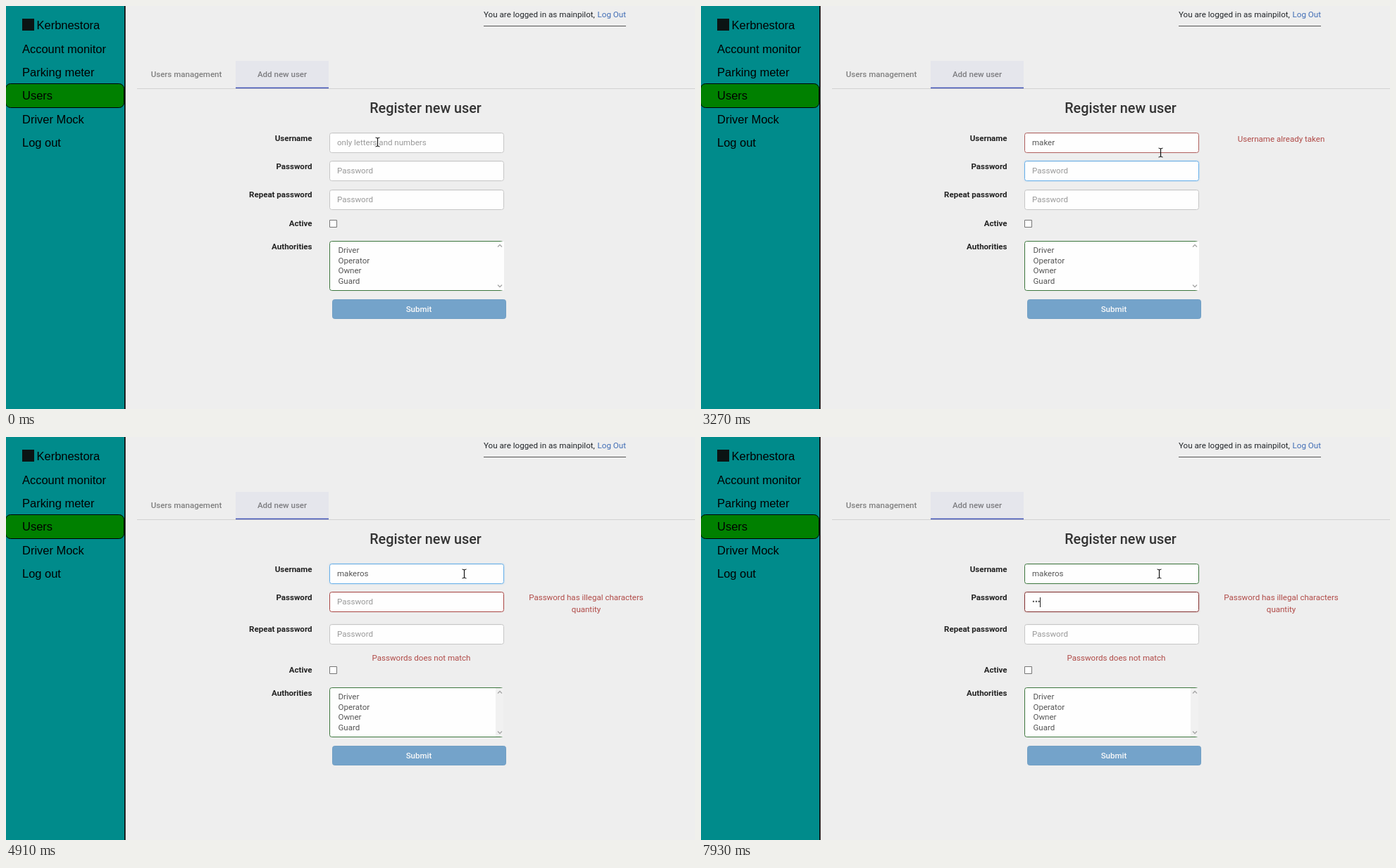
An HTML page with a canvas for the animation above (8 s loop, 978x573 px).

```html
<!DOCTYPE html>
<html lang="en">
<head>
<meta charset="utf-8">
<title>Register new user</title>
<style>
html, body { margin: 0; width: 100%; height: 100%; overflow: hidden; background: #eee; }
canvas { display: block; }
</style>
</head>
<body>
<canvas id="stage" width="978" height="573"></canvas>
<script>
const ctx = document.getElementById('stage').getContext('2d');
const LOOP = 8000, FADE = 150, BLINK = 500;
const SIZE = 11.54;
const ROBOTO = 'Roboto, sans-serif';
const ARIAL = '"Liberation Sans", Arial, sans-serif';
const PAPER = '#fefefe';

// Moments of the story, in ms
const click = 415, tab = 2350, taken = 3160, reclick = 3500;
const retype = 4230, retab = 5165, accepted = 5310;

// Bursts of key presses: one key every `gap` until the text is `to` long
const name = 'makeros';
const userKeys = [
  { at: 1530, gap: 300, to: 2 }, { at: 1950, gap: 120, to: 5 }, { at: retype, gap: 180, to: 7 }
];
const passKeys = [
  { at: 5850, gap: 60, to: 2 }, { at: 6160, gap: 130, to: 4 }, { at: 6530, gap: 100, to: 5 },
  { at: 6840, gap: 108, to: 0 }, { at: 7570, gap: 180, to: 3 }
];

function typed(bursts, t) {
  let length = 0, last = 0;
  for (const { at, gap, to } of bursts) {
    if (t < at) break;
    const keys = Math.min(1 + Math.floor((t - at) / gap), Math.abs(to - length));
    length += keys * Math.sign(to - length);
    last = at + (keys - 1) * gap;
  }
  return { length, last };
}

function focusAt(t) {
  const since = [click, tab, reclick, retab].filter(m => m <= t);
  return { field: ['', 'user', 'pass'][since.length && 2 - since.length % 2], last: since.at(-1) ?? 0 };
}

// Border rgb, then glow rgba
const plain = [198, 198, 198, 102, 175, 233, 0];
const blue = [102, 175, 233, 102, 175, 233, .6];
const red = [169, 68, 66, 206, 132, 131, 0];
const darkRed = [132, 53, 52, 206, 132, 131, .8];
const green = [60, 118, 61, 103, 177, 104, 0];

function userStyle(t) {
  const on = focusAt(t).field === 'user';
  if (t >= taken && t < retype) return on ? darkRed : red;
  if (t >= accepted) return green;
  return on ? blue : plain;
}

function passStyle(t) {
  const on = focusAt(t).field === 'pass';
  if (t >= reclick) return on ? darkRed : red;
  return on ? blue : plain;
}

// Averaging the recent past turns each switch into a fade
function faded(style, t) {
  const n = 15;
  const past = Array.from({ length: n }, (_, i) => style(t - FADE * i / n));
  return plain.map((_, j) => past.reduce((sum, s) => sum + s[j], 0) / n);
}

function ease(v) {
  v = Math.max(0, Math.min(1, v));
  return v * v * (3 - 2 * v);
}
const lerp = (a, b, k) => a + (b - a) * k;

function text(str, x, y, color, opts = {}) {
  const { size = SIZE, weight = 400, family = ROBOTO, align = 'left' } = opts;
  ctx.font = `${weight} ${size}px ${family}`;
  ctx.textAlign = align;
  ctx.fillStyle = color;
  ctx.fillText(str, x, Math.round(y));
}

function rect(x, y, w, h, color) {
  ctx.fillStyle = color;
  ctx.fillRect(x, y, w, h);
}

// Box with a crisp one-pixel border
function box(x, y, w, h, r, fill, stroke) {
  ctx.beginPath();
  ctx.roundRect(x + .5, y + .5, w - 1, h - 1, r);
  ctx.fillStyle = fill;
  ctx.fill();
  ctx.strokeStyle = stroke;
  ctx.lineWidth = 1;
  ctx.stroke();
}

function line(points, color, width = 1) {
  ctx.beginPath();
  points.forEach(p => ctx.lineTo(...p));
  ctx.strokeStyle = color;
  ctx.lineWidth = width;
  ctx.stroke();
}

function sidebar() {
  rect(0, 0, 168, 573, '#008b8b');
  rect(168, 0, 1.65, 573, '#000');
  box(-1, 110, 169, 35, 7, '#008000', '#000');
  rect(23, 18, 17, 17, '#0b1414');
  const items = ['Kerbnestora', 'Account monitor', 'Parking meter', 'Users', 'Driver Mock', 'Log out'];
  items.forEach((item, i) =>
    text(item, i ? 23 : 43.5, 33.4 + i * 33.3, '#000', { size: 16.48, family: ARIAL }));
}

function header() {
  text('You are logged in as mainpilot,', 678, 16, '#212529', { size: 11.64 });
  text('Log Out', 880, 16, '#416db5', { size: 11.64, align: 'right' });
  rect(678, 28, 202, 1, '#555');
  rect(186, 117, 792, 1, '#d2d2d2');
  rect(326, 78, 132, 38, '#e5e6ec');
  rect(326, 115.7, 132, 1.5, '#3f51b5');
  const center = { weight: 500, align: 'center' };
  text('Users management', 256, 101, '#808080', center);
  text('Add new user', 392, 101, '#7d7d81', center);
  text('Register new user', 595.5, 152, '#333', { ...center, size: 19.8 });
}

const label = (str, y) => text(str, 434.5, y, '#222', { weight: 700, align: 'right' });
const error = (str, x, y) => text(str, x, y, '#b04a47', { align: 'center' });

function field(y, style, value, hint, caret) {
  const [r, g, b, ...glow] = style;
  ctx.save();
  ctx.shadowBlur = 3;
  ctx.shadowColor = `rgba(${glow})`;
  rect(460, y + 1, 246, 27, PAPER);
  ctx.restore();
  box(459, y, 248, 29, 3, PAPER, `rgb(${r},${g},${b})`);
  rect(461, y + 1, 244, 1, 'rgba(0,0,0,.04)');
  text(value || hint, 470, y + 18.4, value ? '#555' : '#999');
  if (caret) rect(Math.floor(470 + (value && ctx.measureText(value).width)), y + 8, 1, 14, '#222');
}

function listbox(y, track) {
  box(459, y, 247, 71, 3, PAPER, '#3c763d');
  rect(695, y + 1, 12, 69, track ? '#f1f1f1' : PAPER);
  if (track) rect(706, y, 1, 71, '#eee');
  for (const d of [-1, 1]) {
    const mid = y + 35.5 + d * 28.5;
    line([[698, mid - d * 1.5], [701, mid + d * 1.5], [704, mid - d * 1.5]], '#a6a6a6', 1.3);
  }
  ['Driver', 'Operator', 'Owner', 'Guard'].forEach((role, i) =>
    text(role, 471.5, y + 16.7 + i * 14.83, '#555'));
}

function form(t) {
  const failed = t >= reclick;
  const user = typed(userKeys, t), pass = typed(passKeys, t), focus = focusAt(t);
  const idle = t - Math.max(user.last, pass.last, focus.last);
  const caret = id => focus.field === id && idle % (2 * BLINK) < BLINK;

  label('Username', 192);
  field(180, faded(userStyle, t), name.slice(0, user.length), 'only letters and numbers', caret('user'));
  label('Password', 232);
  field(220, faded(passStyle, t), '•'.repeat(pass.length), 'Password', caret('pass'));

  // Error lines push the lower rows down
  const near = failed ? 5 : 0, far = failed ? 21.5 : 0;
  label('Repeat password', 272.4 + near);
  field(261 + near, plain, '', 'Password', false);
  label('Active', 313.4 + far);
  box(459, Math.round(304.2 + far), 11, 11, 0, PAPER, '#767676');
  label('Authorities', 346 + far);
  listbox(Math.round(334.2 + far), failed);
  const y = Math.round(417.2 + far);
  box(463, y, 247, 28, 3, '#74a3ca', '#719fc4');
  text('Submit', 586, y + 17.6, '#f9f9f9', { weight: 500, align: 'center' });

  if (t >= taken && t < retype) error('Username already taken', 823.5, 192.5);
  if (failed) {
    error('Password has illegal characters', 823.5, 232);
    error('quantity', 823.5, 248.5);
    error('Passwords does not match', 589.5, 318);
  }
}

function pointer(t) {
  const out = ease((t - click) / 255), back = ease((t - 3230) / 200), nudge = ease((t - retype) / 50);
  const x = lerp(lerp(527, 652, out), 653, back) - 3 * nudge;
  const y = lerp(lerp(193, 210, out), 195, back) - nudge;
  ctx.save();
  ctx.translate(Math.round(x) + .5, Math.round(y) + .5);
  if (y < 208.5) {
    line([[0, -6], [0, 6]], '#111', 1.2);
    for (const d of [-1, 1]) line([[-3, 6.5 * d], [0, 5.5 * d], [3, 6.5 * d]], '#111');
  } else {
    const arrow = [[0, 0], [0, 12.5], [2.8, 10], [4.8, 15], [7, 14], [5, 9.3], [8.8, 9], [0, 0]];
    line(arrow, '#111', 1.2);
    ctx.fillStyle = '#fff';
    ctx.fill();
    line(arrow, '#111');
  }
  ctx.restore();
}

const start = performance.now();
function draw() {
  const t = (performance.now() - start) % LOOP;
  rect(0, 0, 978, 573, '#eee');
  sidebar();
  header();
  form(t);
  pointer(t);
  requestAnimationFrame(draw);
}
draw();
</script>
</body>
</html>
```
